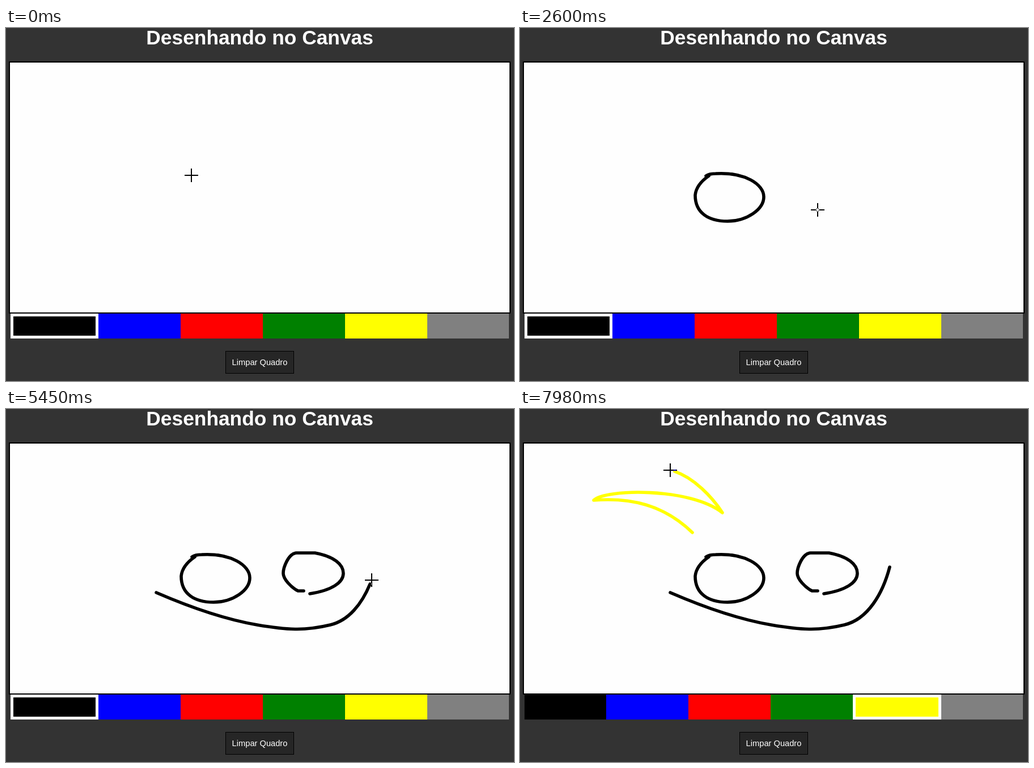
Write an HTML page that moves like this. It is 896x623 px and loops after 8 s.

```html
<!DOCTYPE html>
<html lang="pt">
<head>
<meta charset="utf-8">
<title>Desenhando no Canvas</title>
<style>
  html, body { margin: 0; width: 100%; height: 100%; overflow: hidden; background: #333; }
  svg { display: block; width: 896px; height: 623px; }
  text { font-family: "Liberation Sans", Arial, sans-serif; fill: #fff; text-anchor: middle; }
  #paths path { fill: none; stroke-width: 5.6; stroke-linecap: round; stroke-linejoin: round; }
  #cross { fill: #fff; mix-blend-mode: difference; }
</style>
</head>
<body>
<svg viewBox="0 0 896 623">
  <rect width="896" height="623" fill="#333"/>
  <text x="447.6" y="29" font-size="35.35" font-weight="bold">Desenhando no Canvas</text>
  <rect x="6" y="60" width="883" height="443" fill="#fefefe" stroke="#000" stroke-width="2"/>
  <g id="palette" shape-rendering="crispEdges"></g>
  <rect x="387.5" y="570.5" width="120" height="39" fill="#262626" stroke="#000"/>
  <text x="447.5" y="595" font-size="14.667">Limpar Quadro</text>
  <g id="paths"></g>
  <path id="cross" d="M-1-12h2v11h11v2h-11v11h-2v-11h-11v-2h11z"/>
  <path id="hand" fill="#fff" stroke="#000" stroke-linejoin="round"
    d="M-2.5 14V2Q-2.5.5-.8.5Q1 .5 1 2V8Q3.5 6.5 4 9Q6.5 7.8 7 10Q9.5 9.5 9.5 12V17L7 21V23.5H-2.5V21L-6.5 15Q-7 12-4.5 12.5Z
       M1 8V12M4 9V12.5M7 10V13"/>
</svg>
<script>
const LOOP = 8000;
const INK_LAG = 8;
const PALETTE_TOP = 504, PALETTE_HEIGHT = 44;
const COLORS = ['black', 'blue', 'red', 'green', 'yellow', 'gray'];
const $ = id => document.getElementById(id);

function add(parent, tag, attrs) {
  const el = document.createElementNS('http://www.w3.org/2000/svg', tag);
  return parent.appendChild(set(el, attrs));
}
function set(el, attrs) {
  for (const name in attrs) el.setAttribute(name, attrs[name]);
  return el;
}

// Pointer gestures at constant speed; those with a colour leave ink.
const gestures = [];
function gesture(start, end, d, stroke = 'none') {
  const el = add($('paths'), 'path', { d, stroke });
  const previous = gestures[gestures.length - 1];
  gestures.push({ el, start, end, press: previous ? previous.end : 0, length: el.getTotalLength() });
}

gesture(0, 290, 'M327 260L328 261');
gesture(680, 1800, 'M328 261Q334 257 345 257C397 254 430 276 430 298S400 341 366 341S309 326 309 295Q311 276 333 261', 'black');
gesture(1800, 2560, 'M333 261Q440 270 525 321');
gesture(2680, 3570, 'M525 321H515C503 315 489 300 489 290S498 255 512 254H545C578 260 595 274 595 290S575 320 536 326', 'black');
gesture(3580, 4180, 'M536 326Q340 400 265 324');
gesture(4200, 5520, 'M265 324C325 350 385 371 443 381S530 391 572 381S640 325 652 279', 'black');
gesture(5560, 6060, 'M652 279L384 522');
gesture(6270, 6560, 'M384 522L490 518L640 529');
gesture(6640, 7030, 'M640 529L304 218');
gesture(7080, 7990, 'M304 218C254 169 195 156 130 161C150 141 300 138 357 183C336 151 298 113 260 107', 'yellow');

const swatches = COLORS.map(fill => ({
  frame: add($('palette'), 'rect', { y: PALETTE_TOP, height: PALETTE_HEIGHT, fill: '#fff' }),
  fill: add($('palette'), 'rect', { fill })
}));

function drawPalette(selected) {
  let x = 7.5;
  swatches.forEach(({ frame, fill }, i) => {
    const border = COLORS[i] === selected ? 5 : 0;
    const left = Math.round(x);
    x += border ? 155.5 : 144.9;
    const width = Math.min(887, Math.round(x)) - left;
    set(frame, { x: left, width });
    set(fill, {
      x: left + border, y: PALETTE_TOP + border,
      width: width - 2 * border, height: PALETTE_HEIGHT - 2 * border
    });
  });
}

function render(t) {
  let pointer;
  for (const { el, start, end, press, length } of gestures) {
    const reached = length * Math.min(1, Math.max(0, (t - start) / (end - start)));
    if (t >= start) pointer = el.getPointAtLength(reached);
    const inked = t < end ? Math.max(.1, reached - INK_LAG) : length + 1;
    set(el, { visibility: t < press ? 'hidden' : 'visible', 'stroke-dasharray': `${inked} 9999` });
  }
  drawPalette(t < 6270 ? 'black' : t < 6600 ? 'red' : 'yellow');
  const onPalette = pointer.y >= PALETTE_TOP;
  const transform = `translate(${Math.round(pointer.x)} ${Math.round(pointer.y)})`;
  set($('cross'), { transform, visibility: onPalette ? 'hidden' : 'visible' });
  set($('hand'), { transform, visibility: onPalette ? 'visible' : 'hidden' });
}

const begin = performance.now();
function tick() {
  render((performance.now() - begin) % LOOP);
  requestAnimationFrame(tick);
}
tick();
</script>
</body>
</html>
```
